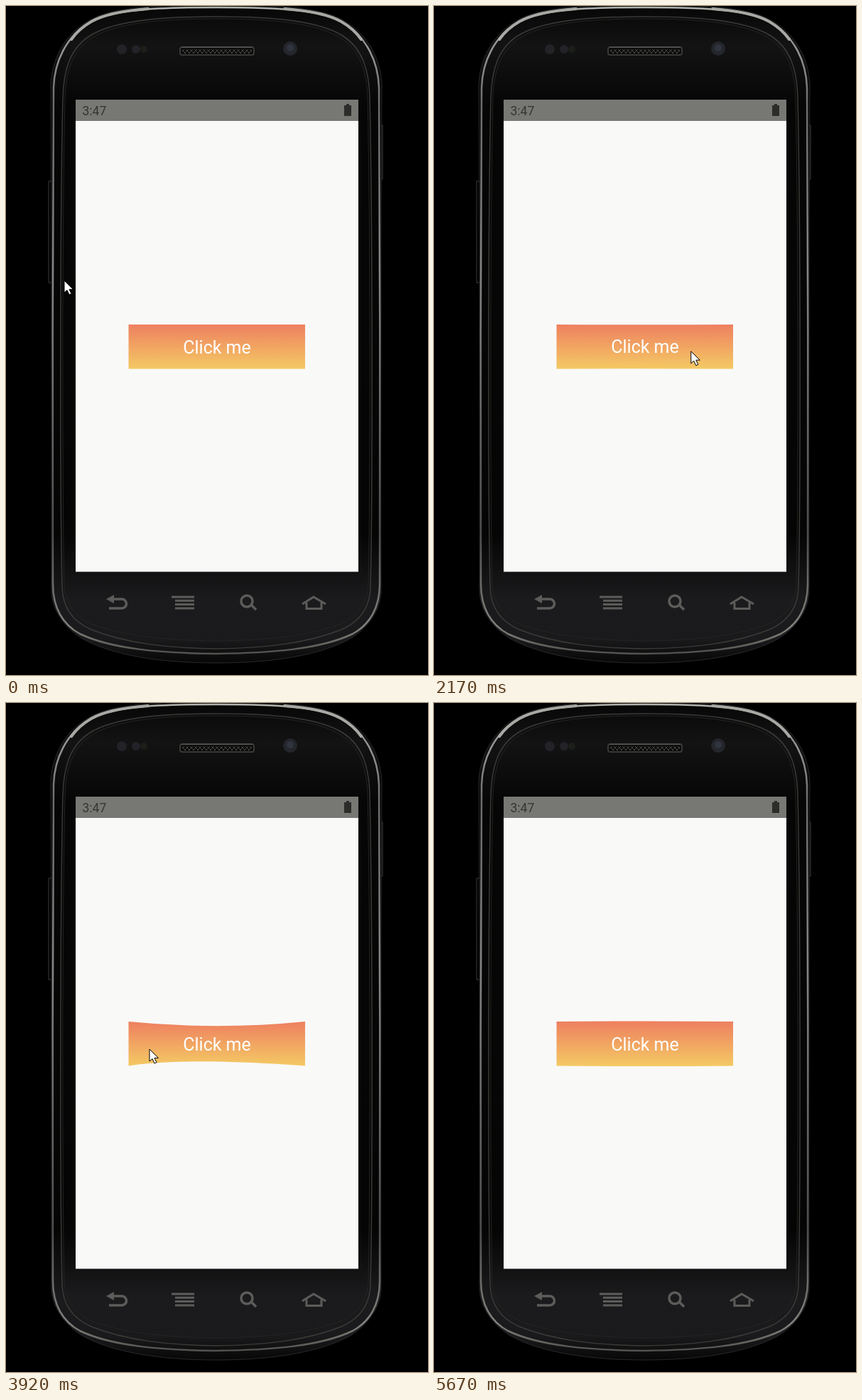
An HTML page that plays this animation: 594 by 943 pixels, repeating every 5750 ms.

```html
<!DOCTYPE html>
<html lang="en">
<head>
<meta charset="utf-8">
<title>Jelly button</title>
<style>
  html, body { margin: 0; width: 100%; height: 100%; overflow: hidden; background: #000; }
  svg { display: block; width: 594px; height: 943px; }
  text { font-family: Roboto, "Open Sans", sans-serif; }
</style>
</head>
<body>
<svg viewBox="0 0 594 943" fill="none">
  <defs>
    <linearGradient id="face" gradientUnits="userSpaceOnUse" x1="0" y1="0" x2="0" y2="930">
      <stop offset="0" stop-color="#070707"/>
      <stop offset=".06" stop-color="#131314"/>
      <stop offset=".15" stop-color="#060606"/>
      <stop offset=".8" stop-color="#050505"/>
      <stop offset=".9" stop-color="#1b1b1d"/>
      <stop offset=".96" stop-color="#1a1a1c"/>
      <stop offset="1" stop-color="#050505"/>
    </linearGradient>
    <linearGradient id="silver" gradientUnits="userSpaceOnUse" x1="0" y1="0" x2="0" y2="930">
      <stop offset="0" stop-color="#b4b4b0"/>
      <stop offset=".15" stop-color="#6c6c6c"/>
      <stop offset=".4" stop-color="#868686"/>
      <stop offset=".8" stop-color="#4c4c4c"/>
      <stop offset=".94" stop-color="#85857f"/>
      <stop offset="1" stop-color="#3c3c3a"/>
    </linearGradient>
    <linearGradient id="sunset" gradientUnits="userSpaceOnUse" x1="0" y1="449" x2="0" y2="512">
      <stop offset="0" stop-color="#ee8060"/>
      <stop offset="1" stop-color="#f4ca64"/>
    </linearGradient>
    <pattern id="mesh" width="6" height="6" patternUnits="userSpaceOnUse">
      <path d="M0 0L6 6M6 0L0 6" stroke="#44443f"/>
    </pattern>
  </defs>

  <!-- Left half of the body, mirrored for the right -->
  <g id="half">
    <path fill="url(#face)" stroke="#29292d" d="M296-1C200-1 148 2 116 21C80 42 64 78 63 112C64 250 65 700 64 822C64 850 80 874 106 891C150 916 220 926 296 926"/>
    <path stroke="url(#silver)" stroke-width="2.5" d="M296 2C200 2 150 6 120 22C84 42 68 80 67 115C65 250 66 700 66 815C66 848 80 872 104 885C150 907 220 912 296 913"/>
    <path stroke="#a8a8a4" stroke-width="4" stroke-linecap="round" d="M200 4C158 7 134 14 120 22C108 29 99 37 92 47"/>
    <path stroke="#3a3a37" stroke-width="1.5" d="M296 15C210 15 150 22 118 42C90 60 81 90 80 130C76 300 76 700 79 820C80 850 95 868 120 879C170 899 230 905 296 906"/>
    <path stroke="#242422" d="M296 18C212 18 153 25 121 45C94 62 84 92 83 130C79 300 79 700 82 815C83 843 98 862 123 872C170 889 230 894 296 895"/>
  </g>
  <use href="#half" transform="matrix(-1 0 0 1 592 0)"/>
  <path stroke="#3c3c40" d="M64 247H60V390H64M528 168H530V244H528"/>

  <!-- Sensors, speaker, camera -->
  <circle cx="163" cy="61" r="7" fill="#232327"/>
  <circle cx="183" cy="61" r="6" fill="#222228"/>
  <circle cx="194" cy="61" r="5" fill="#1c1f19"/>
  <rect x="245" y="58" width="104" height="11" rx="3" fill="#0c0c0c" stroke="#383836" stroke-width="2"/>
  <rect x="248" y="61" width="98" height="6" fill="url(#mesh)"/>
  <path stroke="#666662" d="M247 58H347"/>
  <circle cx="400" cy="60" r="10" fill="#25262c"/>
  <circle cx="400" cy="59" r="5" fill="#2f343e"/>

  <!-- Screen -->
  <path fill="#f9f9f8" d="M98 132H496V797.5H98Z"/>
  <path fill="#777774" d="M98 132H496V162H98Z"/>
  <text x="107.5" y="154" font-size="17.5" fill="#353533">3:47</text>
  <path fill="#2c2c2a" d="M476 140H479V138H483V140H486V155H476Z"/>

  <path id="button" fill="url(#sunset)"/>
  <text id="label" x="297" font-size="25" fill="#fff" text-anchor="middle">Click me</text>

  <!-- Navigation keys -->
  <g stroke="#5c5c5a" stroke-width="3.5">
    <path d="M149 836H163A6.5 6.5 0 0 1 163 849H145"/>
    <path fill="#5c5c5a" stroke="none" d="M141 836L152 830V842Z"/>
    <path stroke-width="3" d="M233 833H265M238 838.3H265M238 843.6H265M238 849H265"/>
    <circle cx="339" cy="839" r="8"/>
    <path d="M345 844L352 851"/>
    <path stroke-width="3" d="M417 843L433 833L450 843M423 841V849.5H444V841"/>
  </g>

  <path id="cursor" fill="#fff" stroke="#000" d="M0 0V17L4 13.5L7 20L10 18.6L7 12.4H12.5Z"/>
</svg>
<script>
const LOOP = 5750, STEP = 250 / 3, REST = 320;
const [button, label, cursor] = ["button", "label", "cursor"].map(id => document.getElementById(id));

// Pointer stops: time, x, y. It clicks at all but the first and last.
const stops = [
  [-REST, 82, 387], [1500, 262, 478], [2265, 376, 488], [3175, 254, 488],
  [3797, 202, 488], [4707, 202, 488], [5160, 486, 500]
];
const exit = stops.length - 1;

const wave = (age, period) => Math.sin(2 * Math.PI * age / period);

function pointerAt(i, t) {
  const [from, x, y] = stops[i], [to, nextX, nextY] = stops[Math.min(i + 1, exit)];
  const p = Math.max(0, (t - from - REST) / (to - from - REST));
  const ease = p * p * (3 - 2 * p);
  return [x + (nextX - x) * ease, y + (nextY - y) * ease];
}

function draw(now) {
  const t = Math.floor(now % LOOP / STEP + 1e-6) * STEP;
  const current = stops.findLastIndex(s => s[0] <= t);
  const gone = current === exit;
  const click = Math.min(current, exit - 1);

  // Each click sets off a damped spring; the label lags behind the edges.
  const age = t - stops[click][0];
  const force = click ? Math.exp(-age / 400) : 0;
  const bulge = -11 * force * wave(age, 330);
  const shift = -4 * force * Math.min(1, age / 100) * wave(age + 30, 300);
  const touch = gone ? 297 : (stops[click][1] + 297) / 2;

  button.setAttribute("d",
    `M172.5 449Q297 ${449 - 2 * bulge} 421 449V511.5Q${touch} ${511.5 + 2 * bulge} 172.5 511.5Z`);
  label.setAttribute("y", 490 + shift);
  cursor.setAttribute("visibility", gone ? "hidden" : "visible");
  if (!gone) cursor.setAttribute("transform", `translate(${pointerAt(current, t)})`);
}

function frame() {
  draw(performance.now());
  requestAnimationFrame(frame);
}
frame();
</script>
</body>
</html>
```
